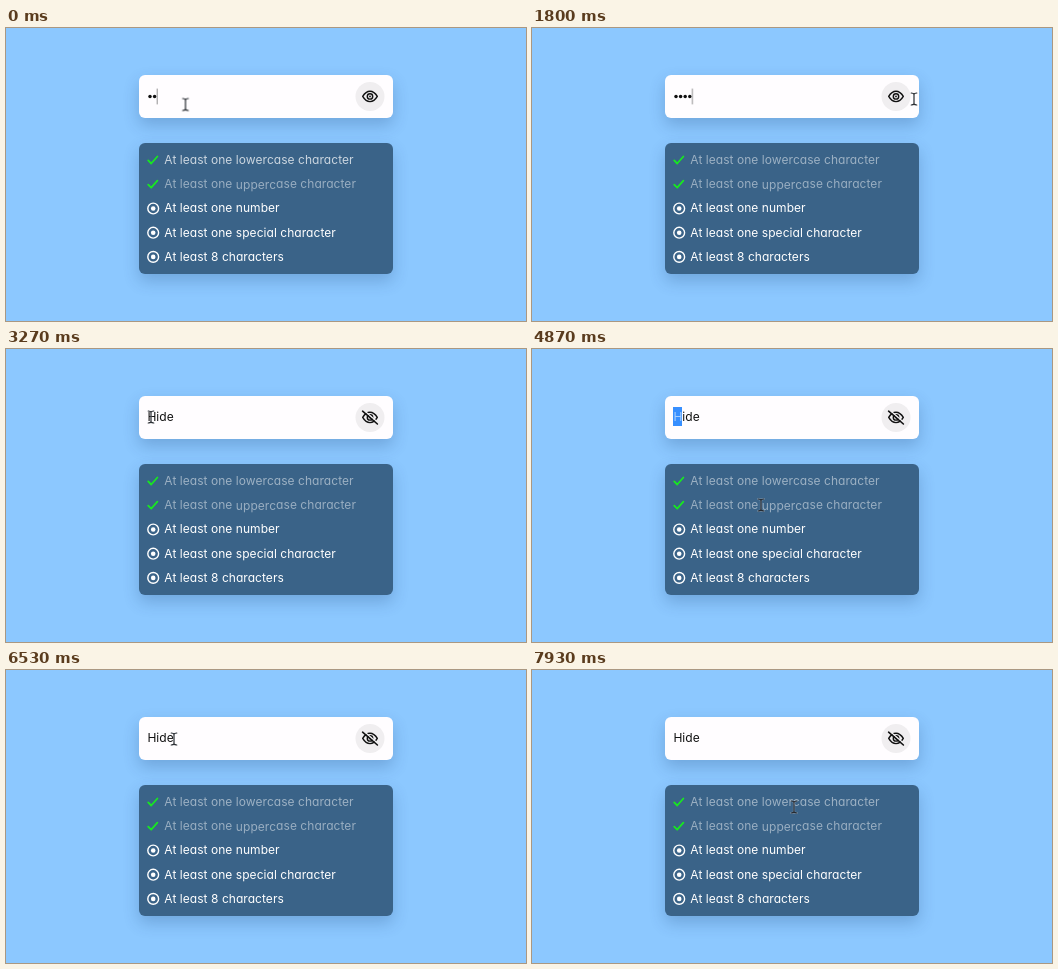
Animation, 520 px wide and 293 px high, one loop 8000 ms. Source, as an HTML page:

```html
<!DOCTYPE html>
<html lang="en">
<head>
<meta charset="utf-8">
<title>Password checklist</title>
<style>
  html, body { margin: 0; width: 100%; height: 100%; overflow: hidden; background: #8cc8ff; }
  body {
    position: relative;
    font: 12px/24.2px Inter, "Open Sans", sans-serif;
    font-feature-settings: "cv11";
    letter-spacing: .05px;
    white-space: pre;
    --loop: 8s infinite;
  }
  .card {
    position: absolute; left: 133px; width: 254px;
    border-radius: 6px;
    box-shadow: 0 7px 16px rgba(20, 60, 110, .24);
  }
  .field { top: 47px; height: 42.5px; background: #fffdff; }
  .rules { top: 115px; height: 131px; background: #3a6388; color: #fff; }
  .rule { position: absolute; left: 25.3px; }
  .rule:nth-of-type(1) { top: 5px; animation: fade var(--loop); }
  .rule:nth-of-type(2) { top: 29.2px; opacity: .48; animation: unfade var(--loop) step-end; }
  .rule:nth-of-type(3) { top: 53.4px; }
  .rule:nth-of-type(4) { top: 77.6px; }
  .rule:nth-of-type(5) { top: 101.8px; }
  .value { position: absolute; left: 8.4px; top: 9px; color: #111; animation: reveal var(--loop) step-end; }
  svg { position: absolute; left: 0; top: 0; fill: none; stroke-linecap: round; stroke-linejoin: round; }

  /* Text selections: the highlight grows as a sized background */
  mark {
    color: inherit; padding: 1.7px 0;
    background: linear-gradient(#378fff, #378fff) no-repeat 0 0 / 0 100%;
  }
  .first { animation: pick-first var(--loop) step-end; }
  .rest { background-position: 100% 0; animation: pick-rest var(--loop) step-end; }
  .word { background-image: linear-gradient(#106bdf, #106bdf); animation: pick-word var(--loop) step-end; }

  .masked, .open { animation: conceal var(--loop) step-end; }
  .shut { animation: reveal var(--loop) step-end; }
  .third { animation: type-third var(--loop) step-end; }
  .fourth { animation: type-fourth var(--loop) step-end; }
  .caret { animation: caret var(--loop) step-end; }
  .cursor { animation: roam var(--loop) ease-in-out; }

  @keyframes fade { 0% { opacity: .74 } 4%, 100% { opacity: .5 } }
  @keyframes unfade { 0% { opacity: .48 } 62% { opacity: 1 } 75% { opacity: .48 } }
  @keyframes reveal { 0% { visibility: hidden } 29.5%, 100% { visibility: visible } }
  @keyframes conceal { 0% { visibility: visible } 29.5%, 100% { visibility: hidden } }
  @keyframes type-third { 0% { opacity: 0 } 3.2%, 100% { opacity: 1 } }
  @keyframes type-fourth { 0% { opacity: 0 } 6.4%, 100% { opacity: 1 } }
  @keyframes caret {
    0% { transform: none }
    3.2% { transform: translateX(4.6px) }
    6.4%, 100% { transform: translateX(9.2px) }
  }
  @keyframes pick-first {
    0% { background-size: 0 100%; color: #111 }
    46% { background-size: 100% 100%; color: #a9d0ff }
    62%, 100% { background-size: 0 100%; color: #111 }
  }
  @keyframes pick-rest {
    0% { background-size: 0 100%; color: #111 }
    83.8% { background-size: 34% 100% }
    84.8% { background-size: 75% 100% }
    85.6% { background-size: 100% 100%; color: #e4f0ff }
    94%, 100% { background-size: 0 100%; color: #111 }
  }
  @keyframes pick-word {
    0% { background-size: 0 100%; color: #fff }
    62% { background-size: 0 100%; color: #fff }
    64% { background-size: 17% 100% }
    65.2% { background-size: 34% 100% }
    66.4% { background-size: 51% 100% }
    67.6% { background-size: 68% 100% }
    68.6% { background-size: 78% 100% }
    69.6% { background-size: 100% 100% }
    75%, 100% { background-size: 0 100% }
  }
  .word ~ span, .rule .before { animation: dim var(--loop) step-end; }
  @keyframes dim {
    0% { opacity: 1 }
    62% { opacity: .48 }
    75%, 100% { opacity: 1 }
  }
  @keyframes roam {
    0%, 11.6% { transform: translate(179.5px, 76.5px) }
    16% { transform: translate(300px, 88px) }
    19% { transform: translate(422px, 112px) }
    22.5% { transform: translate(382px, 71px) }
    26% { transform: translate(390px, 84px) }
    29%, 33.4% { transform: translate(366px, 71px) }
    40.8%, 44.1% { transform: translate(145px, 68px) }
    48% { transform: translate(142px, 68px) }
    54.2%, 55% { transform: translate(215px, 125px) }
    59.2% { transform: translate(226px, 157px) }
    60.8%, 63% { transform: translate(229px, 156px) }
    70% { transform: translate(272px, 160px) }
    72.5% { transform: translate(274px, 162px) }
    75.5% { transform: translate(288px, 200px) }
    81.6%, 83% { transform: translate(168px, 69px) }
    86% { transform: translate(148px, 68px) }
    90.8%, 93.4% { transform: translate(222px, 127px) }
    99%, 100% { transform: translate(262px, 137px) }
  }
</style>
</head>
<body>
  <div class="card field"><div class="value"><mark class="first">H</mark><mark class="rest">ide</mark></div></div>

  <div class="card rules">
    <div class="rule">At least one lowercase character</div>
    <div class="rule"><span class="before">At least one </span><mark class="word">upperc</mark><span>ase character</span></div>
    <div class="rule">At least one number</div>
    <div class="rule">At least one special character</div>
    <div class="rule">At least 8 characters</div>
  </div>

  <svg width="520" height="293" viewBox="0 0 520 293">
    <defs>
      <path id="check" d="M142.2 132.4l3 3.1 6.2-7" stroke="#18e820" stroke-width="1.8"/>
      <g id="ring">
        <circle cx="147.2" r="5.4" stroke="#fff" stroke-width="1.4"/>
        <circle cx="147.2" r="2.3" fill="#fff"/>
      </g>
      <path id="beam" d="M-2.8-6Q-.4-6 0-4.8Q.4-6 2.8-6M0-4.8V4.8M-2.8 6Q-.4 6 0 4.8Q.4 6 2.8 6"/>
      <g id="eye" stroke="#111" stroke-width="1.45">
        <path d="M-7.3 0Q-4.2-5.2 0-5.2T7.3 0Q4.2 5.2 0 5.2T-7.3 0Z"/>
        <circle r="2.7"/>
        <circle r=".9" fill="#111" stroke="none"/>
      </g>
    </defs>

    <use href="#check"/>
    <use href="#check" y="24.2"/>
    <use href="#ring" y="180.5"/>
    <use href="#ring" y="204.7"/>
    <use href="#ring" y="228.9"/>

    <g class="masked">
      <g fill="#111">
        <circle cx="144" cy="68.6" r="1.75"/>
        <circle cx="148.6" cy="68.6" r="1.75"/>
        <circle class="third" cx="153.2" cy="68.6" r="1.75"/>
        <circle class="fourth" cx="157.8" cy="68.6" r="1.75"/>
      </g>
      <path class="caret" d="M151.2 61V76" stroke="#777" stroke-width=".8"/>
    </g>

    <g transform="translate(364 68.4)">
      <circle r="14.5" fill="#f0eef0"/>
      <use class="open" href="#eye"/>
      <g class="shut">
        <use href="#eye"/>
        <path d="M-6.2-7.2L8.2 5.4" stroke="#f0eef0" stroke-width="1.5"/>
        <path d="M-7.4-6.2L7.4 6.6" stroke="#111" stroke-width="1.6"/>
      </g>
    </g>

    <g class="cursor">
      <use href="#beam" stroke="#fff" stroke-opacity=".35" stroke-width="2.2"/>
      <use href="#beam" stroke="#20242a" stroke-width="1.15"/>
    </g>
  </svg>
</body>
</html>
```
